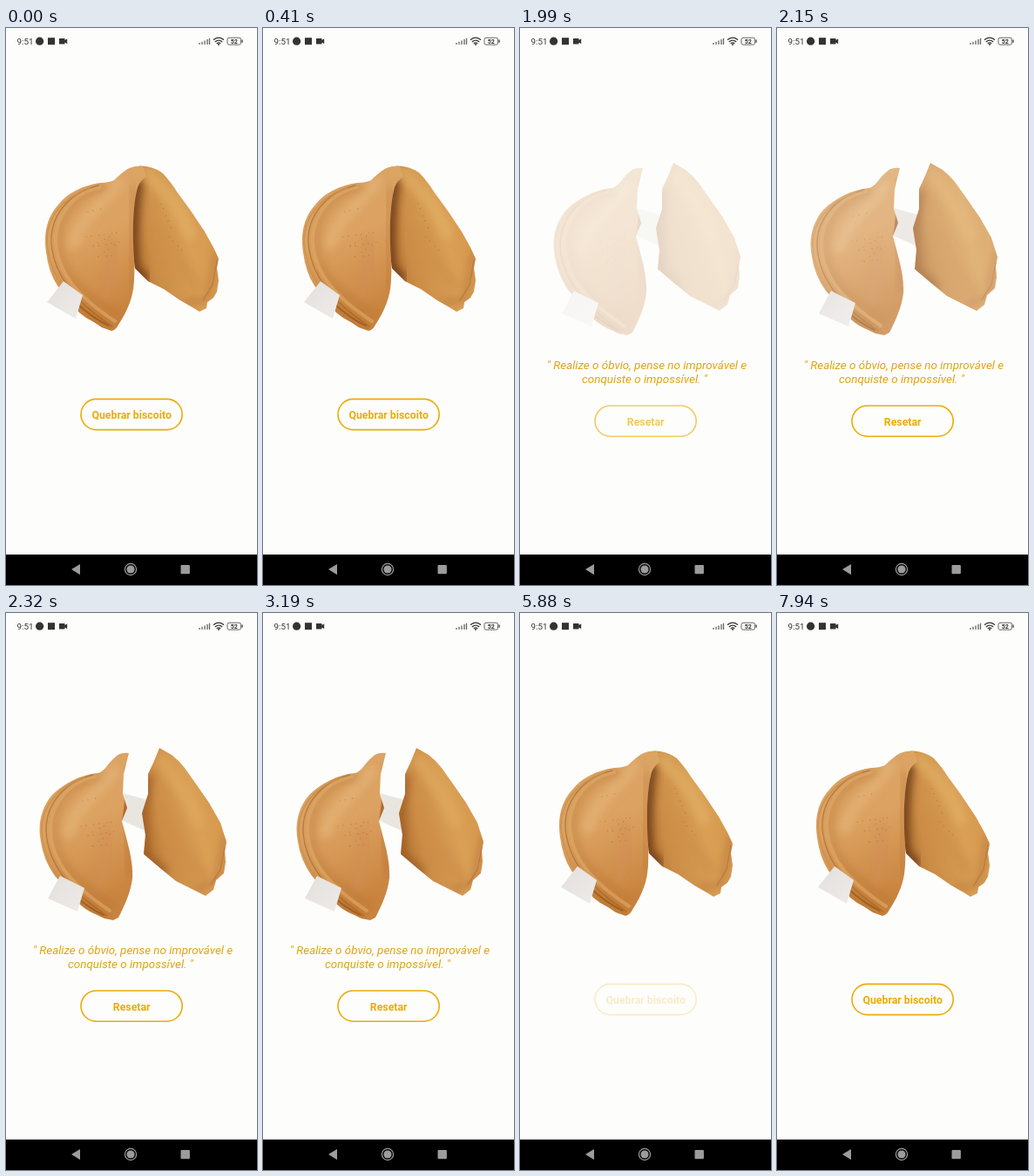
An HTML page that plays this animation: 288 by 640 pixels, repeating every 7990 ms.

```html
<!DOCTYPE html>
<html lang="pt-BR">
<head>
<meta charset="utf-8">
<title>Biscoito da sorte</title>
<style>
  html, body { margin: 0; width: 100%; height: 100%; overflow: hidden; background: #fdfdfc; }
  svg { display: block; width: 100vw; height: 100vh; }
  text { font-family: Roboto, Arial, sans-serif; }
  .whole, .broken, .fade, .press { animation: 7990ms linear infinite; }
  .whole { animation-name: whole; animation-timing-function: step-end; }
  .broken { animation-name: broken; animation-timing-function: step-end; visibility: hidden; }
  .fade { animation-name: fade; }
  .press { animation-name: press; }
  .button { fill: none; stroke: #ebac08; stroke-width: 1.6; }
  .label { font-size: 12.3px; font-weight: 700; fill: #ebac08; text-anchor: middle; }
  .message { font-size: 13.4px; font-style: italic; fill: #dfa413; text-anchor: middle; }
  .soft { filter: url(#soft); }
  .line { fill: none; stroke-linecap: round; stroke-linejoin: round; }
  .pores { stroke: #9a5a24; stroke-width: 1.2; stroke-dasharray: 0 6 0 9; opacity: .55; }

  @keyframes whole {
    0% { visibility: visible; }
    23.529% { visibility: hidden; }
    73.592%, 100% { visibility: visible; }
  }
  @keyframes broken {
    0% { visibility: hidden; }
    23.529% { visibility: visible; }
    73.592%, 100% { visibility: hidden; }
  }
  @keyframes fade {
    0%, 23.967% { opacity: 0; }
    27.722%, 100% { opacity: 1; }
  }
  @keyframes press {
    0%, 19.775% { opacity: 1; }
    21.277% { opacity: .2; }
    23.279% { opacity: .2; animation-timing-function: ease-in-out; }
    26.408%, 69.837% { opacity: 1; }
    71.214% { opacity: .2; }
    73.217% { opacity: .2; animation-timing-function: ease-in-out; }
    76.971%, 100% { opacity: 1; }
  }
</style>
</head>
<body>
<svg viewBox="0 0 288 640">
  <defs>
    <filter id="soft" x="-50%" y="-50%" width="200%" height="200%"><feGaussianBlur stdDeviation="5"/></filter>
    <linearGradient id="dough" x1="0" y1="0" x2=".25" y2="1">
      <stop offset="0" stop-color="#dba566"/>
      <stop offset=".5" stop-color="#dca261"/>
      <stop offset="1" stop-color="#c9843f"/>
    </linearGradient>
    <linearGradient id="flap" x1="0" y1=".7" x2="1" y2=".3">
      <stop offset="0" stop-color="#b0702f"/>
      <stop offset=".25" stop-color="#cb8c46"/>
      <stop offset=".65" stop-color="#daa056"/>
      <stop offset="1" stop-color="#d4954a"/>
    </linearGradient>
    <linearGradient id="paper" x1="0" y1="0" x2="1" y2="1">
      <stop offset="0" stop-color="#e3dfdd"/>
      <stop offset="1" stop-color="#eeebe9"/>
    </linearGradient>

    <path id="wl" d="M157 159C143 157 135 164 124 175Q117 178 108 178C88 181 71 189 60 203C46 218 43 238 46 258Q49 281 59 296L84 327Q92 334 101 338L110 344L121 348Q126 347 129 341C137 329 144 314 146 300Q148 286 147 266C145 240 145 205 151 183Q154 175 161 171Z"/>
    <path id="wr" d="M147 160C157 156 171 160 180 167Q190 178 196 188L212 210L228 234L238 252L244 265L242 276L244 290L242 303L238 310L231 315L230 322L222 326L214 321L200 313L181 300L163 291L148 276L142 230Z"/>
    <path id="bl" d="M141 161Q131 160 126 165C117 172 113 183 105 184C85 186 66 196 53 209C40 224 36 244 40 263Q43 284 56 302L85 335Q94 343 105 347L113 351L123 353L129 350C137 334 143 321 145 305Q146 288 139 262L133 239L139 224L134 208L135 185Z"/>
    <path id="br" d="M176 155L190 163Q198 169 205 178L217 195L233 218L246 241L253 263L251 274L252 286L250 299L241 307L238 318L229 325L215 318L195 308L178 294L158 277L160 255L156 230L163 208L163 185L170 170Z"/>
    <clipPath id="wlClip"><use href="#wl"/></clipPath>
    <clipPath id="wrClip"><use href="#wr"/></clipPath>
    <clipPath id="blClip"><use href="#bl"/></clipPath>
    <clipPath id="brClip"><use href="#br"/></clipPath>

    <g id="rim" class="line">
      <path class="soft" d="M112 183C85 188 60 213 61 245C62 280 84 304 130 332" stroke="#b87435" stroke-width="6" opacity=".6"/>
      <path d="M108 183C79 188 56 215 57 246C59 282 83 309 125 337" stroke="#dda765" stroke-width="4" opacity=".7"/>
      <path d="M106 181C72 189 51 216 52 246C54 283 79 314 122 343" stroke="#a5662c" stroke-width="1.4" opacity=".6"/>
      <path d="M96 184C64 195 46 219 47 246C49 284 74 317 116 345" stroke="#cc9150" stroke-width="2" opacity=".8"/>
      <path class="soft" d="M72 311L118 345" stroke="#94500e" stroke-width="5" opacity=".55"/>
      <path d="M80 315Q98 333 118 342" stroke="#8d4d1c" stroke-width="1.8" opacity=".6"/>
    </g>
    <g id="crumb" class="line">
      <path class="soft" d="M130 177C108 207 86 218 78 247" stroke="#e5b67b" stroke-width="13" opacity=".65"/>
      <path class="soft" d="M120 248Q127 285 112 307" stroke="#d09055" stroke-width="16" opacity=".5"/>
      <path class="pores" d="M92 240L127 235L96 252L130 246L103 264L128 260M94 211L113 207"/>
    </g>
  </defs>

  <rect width="288" height="640" fill="#fdfdfc"/>

  <g fill="#333">
    <text x="12.5" y="18.7" font-size="9.8">9:51</text>
    <circle cx="38.6" cy="15.2" r="4.6"/>
    <rect x="48" y="11.2" width="8" height="8"/>
    <path d="M61 12h6.5v2l2.7-1.7v6l-2.7-1.7v2H61z"/>
    <path d="M222 19v-2M225 19v-3.2M228 19v-4.5M231 19v-6M233.5 19v-7.3" stroke="#666" stroke-width="1.3"/>
    <g class="line" stroke="#333" stroke-width="1.4">
      <path d="M238.5 13.3Q244 9 249.5 13.3M240.3 15.6Q244 12.7 247.7 15.6M242.2 17.6Q244 16.2 245.8 17.6"/>
    </g>
    <circle cx="244" cy="19" r="1"/>
    <rect x="254" y="11.2" width="15.5" height="8" rx="2" fill="none" stroke="#666"/>
    <path d="M270.5 13.6h1.2v3.2h-1.2z"/>
    <text x="261.8" y="17.8" font-size="7" font-weight="700" text-anchor="middle">52</text>
  </g>

  <g class="whole">
    <use href="#wr" fill="url(#flap)"/>
    <g clip-path="url(#wrClip)" class="line">
      <path class="soft" d="M151 178C146 215 144 251 148 277L158 287" stroke="#6b3812" stroke-width="13" opacity=".85"/>
      <path class="soft" d="M165 171Q195 199 211 236" stroke="#e2b068" stroke-width="15" opacity=".65"/>
      <path class="soft" d="M181 238Q196 268 219 295" stroke="#cd8f4b" stroke-width="15" opacity=".6"/>
      <path class="soft" d="M242 257L231 313L206 315" stroke="#b5743a" stroke-width="4"/>
      <path d="M242 267L237 295L226 313" stroke="#b5743a" stroke-width="1.5" opacity=".6"/>
      <path class="pores" d="M178 202L190 231M187 240L207 260" opacity=".4"/>
    </g>
    <use href="#wl" fill="url(#dough)"/>
    <g clip-path="url(#wlClip)">
      <use href="#crumb"/>
      <path class="soft line" d="M147 185Q141 246 144 299" stroke="#b57336" stroke-width="5" opacity=".6"/>
      <use href="#rim"/>
    </g>
    <g clip-path="url(#wrClip)">
      <path class="line soft" d="M137 167Q151 159 170 169" stroke="#dba861" stroke-width="7" opacity=".7"/>
    </g>
    <path d="M66 291L88 307L80 334L47 315Z" fill="url(#paper)"/>
    <g class="press">
      <rect class="button" x="86" y="426.4" width="116.2" height="35.2" rx="17.6"/>
      <text class="label" x="144.2" y="448.5">Quebrar biscoito</text>
    </g>
  </g>

  <g class="broken">
    <g class="fade">
      <path d="M134 207L163 215L159 250L132 238Z" fill="#e9e6e0"/>
      <use href="#br" fill="url(#flap)"/>
      <g clip-path="url(#brClip)" class="line">
        <path class="soft" d="M164 190L158 231L160 279L181 297" stroke="#8f4d1c" stroke-width="9" opacity=".65"/>
        <path class="soft" d="M179 170Q207 207 220 238" stroke="#e0aa60" stroke-width="16" opacity=".65"/>
        <path class="soft" d="M183 239Q203 279 226 301" stroke="#cd8d4a" stroke-width="15" opacity=".6"/>
        <path class="soft" d="M252 257L242 309L218 318" stroke="#b5703a" stroke-width="4"/>
        <path d="M251 270L246 295L235 312" stroke="#b5703a" stroke-width="1.4" opacity=".6"/>
      </g>
      <use href="#bl" fill="url(#dough)"/>
      <g clip-path="url(#blClip)">
        <g transform="translate(-6 5)">
          <use href="#crumb"/>
          <use href="#rim"/>
        </g>
        <path class="soft line" d="M138 182L139 231L143 300" stroke="#b5692e" stroke-width="5" opacity=".7"/>
        <path d="M135 187L140 224L133 239L137 211Z" fill="#a05a2a" opacity=".65"/>
      </g>
      <path d="M62 302L90 316L82 343L48 328Z" fill="url(#paper)"/>
    </g>
    <text class="message"><tspan x="145.5" y="391.5">" Realize o óbvio, pense no improvável e</tspan><tspan x="143" y="407.5">conquiste o impossível. "</tspan></text>
    <g class="press">
      <rect class="button" x="86" y="434" width="116.2" height="35.2" rx="17.6"/>
      <text class="label" x="144.2" y="456.5">Resetar</text>
    </g>
  </g>

  <rect y="605" width="288" height="35" fill="#000"/>
  <g fill="#9c9c9c">
    <path d="M75 622L85 616V628.3Z"/>
    <circle cx="143" cy="622" r="4.6"/>
    <circle cx="143" cy="622" r="6.6" fill="none" stroke="#9c9c9c" stroke-width="1.2"/>
    <rect x="200.5" y="617" width="10.4" height="10.2" rx="1"/>
  </g>
</svg>
</body>
</html>
```
